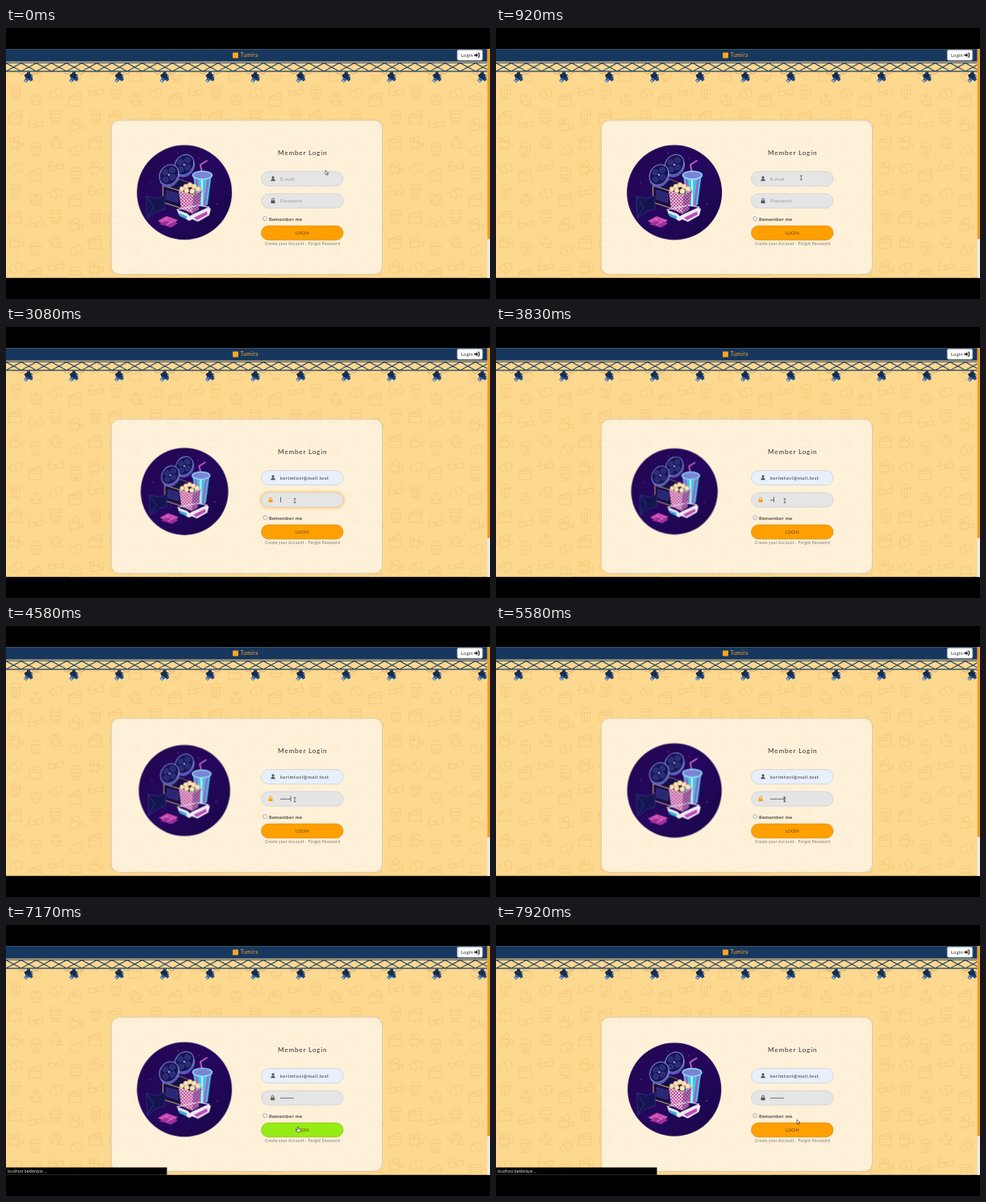
An HTML page that plays this animation: 600x337 px, repeating every 8 s.

```html
<!DOCTYPE html>
<html lang="en">
<head>
<meta charset="utf-8">
<title>Member Login</title>
<style>
html, body { margin: 0; width: 100%; height: 100%; overflow: hidden; background: #000; }
svg { display: block; width: 100%; height: 100%; font-family: Lato, sans-serif; }
#art { transform-origin: 221.2px 204.5px; }
.line { fill: none; stroke-linecap: round; stroke-linejoin: round; }
</style>
</head>
<body>
<svg viewBox="0 0 600 337">
<defs>
  <g id="icon0"><path d="M-6-3l2 11h8l2-11zM-2-3l1 11M2-3l-1 11M-6-3q-2-4 2-4q1-4 4-1q5-2 5 2q3 1 1 3"/></g>
  <g id="icon1"><circle r="7"/><circle cy="-4" r="1.800"/><circle cx="-3.500" cy="2" r="1.800"/><circle cx="3.500" cy="2" r="1.800"/><path d="M0 7h9"/></g>
  <g id="icon2"><path d="M-8 1l9-6l7 2l-1 4l1 3l-8 4l-7-3l1-2zM-2-3l4 8"/></g>
  <g id="icon3"><path d="M-8-3h15v11h-15zM-8-3l14-5l1 4M-4-4l2-3M1-6l3-2M-8 0h15"/></g>
  <g id="icon4"><path d="M-9 0l8-2l1 5l-7 2zM1-2l8-2l1 5l-8 2zM-9 0l2-7l3-1M9-4l-3-5"/></g>
  <g id="icon5"><path d="M-7-2l1 7h12l1-7M-6 1h12M-5 5l10 5M5 5l-10 5M-6-8h12v4h-12z"/></g>
  <g id="icon6"><path d="M-7 0h11v7h-11zM4 2l5-2v6l-5-2M-3 7l-3 4M0 7l3 4"/><circle cx="-5" cy="-3" r="2.500"/><circle cx="1" cy="-4" r="3.500"/></g>
  <pattern id="doodles" width="124" height="124" y="68" patternUnits="userSpaceOnUse">
    <g id="icons" class="line" stroke="#f4ca7c" stroke-width=".9"></g>
  </pattern>
  <pattern id="truss" width="18.77" height="13" y="42" patternUnits="userSpaceOnUse">
    <path d="M0 1.500L18.770 11.800M0 11.800L18.770 1.500M0 1.200H19M0 11.800H19" stroke="#1b3c64" stroke-width="1.150"/>
  </pattern>
  <g id="lamp">
    <path class="line" d="M-13 0q3 5 8 1M5 1q5 4 8-1" stroke="#a18b61" stroke-width=".6"/>
    <path d="M-2 0h4v3h-4z" fill="#183963"/>
    <path d="M-5.500 4l4-2.500l6 2l1 3l-4 4l-5-2z" fill="#172d4d"/>
    <path d="M-3 7l-3 4l3 2.500l4-4z" fill="#3568ab"/>
    <path d="M1 9l3-3l1.500 4l-3 2z" fill="#20477d"/>
    <path d="M-4.500 10.500l2 1.500M3.500 4.500l1.500 2" stroke="#c5d9eb" stroke-width="1.200"/>
  </g>
  <linearGradient id="night" x2="1" y2="1">
    <stop stop-color="#220650"/><stop offset=".5" stop-color="#25085e"/><stop offset="1" stop-color="#180747"/>
  </linearGradient>
  <filter id="soft" x="-20%" y="-60%" width="140%" height="220%"><feGaussianBlur stdDeviation="1.700"/></filter>
  <g id="wheel">
    <ellipse cx="2" cy="1.500" rx="11" ry="13.500" fill="#3b43a8" stroke="#7d86e3" stroke-width=".8"/>
    <ellipse rx="11" ry="13.500" fill="#17174f" stroke="#858bdf" stroke-width="1"/>
    <g fill="#2c2a78" stroke="#4b50b5" stroke-width=".5">
      <ellipse cy="-7" rx="3.500" ry="3.200"/><ellipse cx="-5.500" rx="2.800" ry="3.500"/><ellipse cx="5.500" rx="2.800" ry="3.500"/><ellipse cy="7" rx="3.500" ry="3.200"/>
    </g>
    <circle r="1.400" fill="#9aa0ee"/>
  </g>
  <pattern id="checks" width="4" height="4" patternUnits="userSpaceOnUse">
    <rect width="4" height="4" fill="#f3d2d8"/><path d="M0 0h2v2H0zM2 2h2v2H2z" fill="#b6459d"/>
  </pattern>
  <clipPath id="page"><path d="M0 26.300H600V310.700H0z"/></clipPath>
</defs>

<rect width="600" height="337"/>
<g clip-path="url(#page)">
  <rect y="26" width="600" height="285" fill="#fdd88f"/>
  <rect y="55" width="600" height="256" fill="url(#doodles)"/>
  <rect y="42" width="600" height="13" fill="url(#truss)"/>
  <g id="lamps"></g>
  <rect y="26" width="600" height="15.700" fill="#17375f"/>
  <rect x="281" y="30.500" width="7" height="7" rx="1" fill="#ffa51e"/>
  <text x="290.500" y="36.300" font-size="6.800" letter-spacing=".35" fill="#f5a42a">Tumira</text>
  <rect x="559.300" y="27.200" width="31.500" height="13" rx="2" fill="#fff" stroke="#8d99a8" stroke-width=".7"/>
  <text x="564" y="35.900" font-size="5.900" letter-spacing=".25" fill="#333">Login</text>
  <path d="M580.500 32.700h2.300v-1.500l2.600 2.500l-2.600 2.500v-1.500h-2.300z" fill="#222"/>
  <path class="line" d="M585 31.200h1.500v5h-1.500" stroke="#222"/>
  <rect x="596.700" y="26" width="3.300" height="285" fill="#ececed"/>
  <rect x="596.700" y="26" width="3.300" height="236.500" fill="#ee9d20"/>

  <rect x="130.500" y="114.800" width="336" height="191.500" rx="10" fill="#fff" fill-opacity=".66" stroke="#d8cbb0" stroke-width="1"/>

  <g id="art">
    <circle cx="221.200" cy="204.500" r="59" fill="url(#night)"/>
    <g fill="#b02fae"><circle cx="213" cy="156" r=".8"/><circle cx="239" cy="162" r=".7"/><circle cx="179" cy="192" r=".7"/><circle cx="262" cy="219" r=".8"/></g>
    <path d="M195 196l21-8l17 7l-1 24l-12 6l-25-8z" fill="#171046"/>
    <path d="M195 196l22 7l16-8l-1 24l-12 6l-25-8zM217 203l1 21" class="line" stroke="#e2b66c" stroke-width="1"/>
    <path d="M199 202l14 4v11l-14-4z" fill="#2b2775" stroke="#5550a5" stroke-width=".5"/>
    <path d="M195 196l21-8l17 7" class="line" stroke="#bd9170" stroke-width=".7"/>
    <use href="#wheel" transform="translate(221 170) rotate(35)"/>
    <use href="#wheel" transform="translate(202 182.500) rotate(35)"/>
    <path d="M174 209l13 3l10-4v17l-10 3l-12 9z" fill="#14154f" stroke="#34348a" stroke-width=".8"/>
    <path d="M175 210l8 13l-8 13" class="line" stroke="#2b347f"/>
    <path d="M244 184l-3-14l8-5" class="line" stroke="#c760c2" stroke-width="1.900"/>
    <path d="M232 183l23-1l-5 38q-7 4-13 0z" fill="#42c5e2"/>
    <path d="M236 187l4 33M251 186l-5 35" class="line" stroke="#b057c5" stroke-width="2.500"/>
    <path d="M243 188v33" stroke="#d7f3f6" stroke-width="2"/>
    <ellipse cx="243.500" cy="183" rx="12" ry="5" fill="#7b83d9" stroke="#95e6f5" stroke-width="1.400"/>
    <path d="M214 202l18 6l11-7l-4 25l-8 5l-14-6z" fill="url(#checks)"/>
    <path d="M232 208l11-7l-4 25l-8 5z" fill="#57217b" fill-opacity=".45"/>
    <path d="M214 202l18 6l11-7" class="line" stroke="#f7d9cf" stroke-width=".8"/>
    <g fill="#fbe6b7" stroke="#dbaa79" stroke-width=".5">
      <circle cx="218" cy="200" r="2.800"/><circle cx="238" cy="200" r="3"/><circle cx="223" cy="197" r="3"/>
      <circle cx="233" cy="197" r="3"/><circle cx="228" cy="195" r="3"/><circle cx="224" cy="202" r="3"/><circle cx="231" cy="203" r="3.200"/>
    </g>
    <path d="M212 226l13 5l3 3l3-2l20-9l3 2l-2 8l-14 8l-7-3l-4 2l-13-8z" fill="#f1eaf4"/>
    <path d="M214 230l10 4v4l-9-4z" fill="#38afd2"/><path d="M233 236l16-8l1 4l-13 7z" fill="#b94fb5"/>
    <path d="M212 226l24-5M252 223l-14-3" class="line" stroke="#e2d5ef" stroke-width="1.200"/>
    <path d="M188 240l11-6l14 5l-10 9z" fill="#d04eb3"/><path d="M190 244l11-6l12 5l-8 5z" fill="#a22f9d"/>
    <path d="M197 238l9 4M199 245l8-5" stroke="#f2a0d4" stroke-width=".8"/>
  </g>

  <text x="337" y="157.900" font-size="8.200" letter-spacing=".8" fill="#333">Member Login</text>

  <g id="mailGlow" class="line" stroke="#ffa000" filter="url(#soft)"><rect x="316.500" y="178.500" width="101.500" height="18" rx="9" stroke-width="4"/></g>
  <g id="passGlow" class="line" stroke="#ffa000" filter="url(#soft)"><rect x="316.500" y="206" width="101.500" height="18" rx="9" stroke-width="4"/></g>
  <rect id="mailBox" x="316.500" y="178.500" width="101.500" height="18" rx="9" stroke="#cdcdd0" stroke-width=".7"/>
  <rect x="316.500" y="206" width="101.500" height="18" rx="9" fill="#e5e5e6" stroke="#cdcdd0" stroke-width=".7"/>
  <g id="mailIcon"><circle cx="331" cy="185.800" r="1.600"/><path d="M328.300 190.200q0-2.700 2.700-2.700t2.700 2.700z"/></g>
  <g id="passIcon"><rect x="328.500" y="214.500" width="5" height="3.400" rx=".6"/><path class="line" d="M329.600 214.500v-1.200q0-1.400 1.400-1.400t1.400 1.400v1.200" stroke="currentColor" stroke-width=".9"/></g>
  <text id="mailText" x="340" y="189.600" font-size="5.900"></text>
  <text id="passHint" x="340" y="217" font-size="5.900" letter-spacing=".25" fill="#999">Password</text>
  <text id="passText" x="340" y="217" font-size="6" fill="#555" font-family="Liberation Sans, sans-serif"></text>
  <rect id="caret" width=".7" height="6.500" fill="#333"/>

  <rect x="319" y="234.900" width="4.200" height="4.200" rx=".8" fill="#fff" stroke="#777" stroke-width=".6"/>
  <text x="326" y="239.600" font-size="6" font-weight="500" letter-spacing=".3" fill="#222">Remember me</text>
  <rect id="button" x="316.500" y="246" width="101.500" height="17.700" rx="8.800" stroke-width=".7"/>
  <text x="367.300" y="256.800" font-size="5.500" text-anchor="middle" fill="#68480d">LOGIN</text>
  <text x="321" y="270" font-size="4.900" letter-spacing=".25" fill="#777">Create your Account - Forgot Password</text>

  <g id="menu" font-family="Open Sans, sans-serif" font-size="4.900" font-weight="500" fill="#222">
    <rect x="316.500" y="197" width="103" height="35" rx="1" fill="#0002"/>
    <rect x="316" y="196.500" width="103" height="34.500" rx="1" fill="#fff"/>
    <rect id="row" x="316" y="199" width="103" height="14" fill="#eaeaec"/>
    <text x="320.500" y="207.800">kerimtovl@mail.test</text>
    <text x="320.500" y="221.800">kerimtovl</text>
  </g>
  <g id="status">
    <rect y="301.500" width="199.500" height="9.500"/>
    <text x="1.500" y="307.800" font-size="4.800" font-family="Open Sans, sans-serif" fill="#eee">localhost bekleniyor...</text>
  </g>
</g>
<g id="pointer">
  <path id="arrow" d="M0 0v5.200l1.300-1.100l.9 1.900l.9-.4l-.8-1.900h1.700z" fill="#fff" stroke="#222" stroke-width=".6"/>
  <path id="beam" class="line" d="M-1-2.500h2M0-2.500v5M-1 2.500h2" stroke="#333" stroke-width=".6"/>
  <path id="hand" d="M-.7-3q.7-.7 1.300 0v2.400l2.200.6q.6.300.4 1.300l-.6 2.200h-3.200l-2-2.700q.4-1 1.900 0z" fill="#fff" stroke="#222" stroke-width=".6"/>
</g>
</svg>
<script>
const LOOP = 8000, STEP = 250 / 3;
const MAIL_FOCUS = 1250, MENU_OPEN = 1420, PREVIEW = 2170, PICK = 2420;
const PASS_FOCUS = 2830, HOVER = 6080, CLICK = 6830, LEAVE = 7580;
const keys = [3670, 3830, 4000, 4170, 4330, 4500, 5250, 5500];
const path = [
  [0, 396, 177], [420, 396, 177], [1080, 375, 188], [1900, 375, 188],
  [2170, 364, 205], [2420, 363, 206], [2750, 358, 216], [5920, 358, 216],
  [6250, 362, 254], [7420, 362, 254], [7750, 373, 242]
];
const $ = id => document.getElementById(id);
const clamp = v => Math.max(0, Math.min(1, v));
const ramp = (t, start, length) => clamp((t - start) / length);
const mix = (a, b, p) => `color-mix(in srgb, ${b} ${p * 100}%, ${a})`;
const show = (id, on) => $(id).style.display = on ? '' : 'none';
const repeat = (length, draw) => Array.from({ length }, (_, i) => draw(i)).join('');

$('lamps').innerHTML = repeat(11, i =>
  `<use href="#lamp" x="${28 + i * 56.25}" y="54.500"/>`);

// Staggered rows, five icons in each.
$('icons').innerHTML = repeat(20, i => {
  const col = i % 5, row = Math.floor(i / 5);
  return `<use href="#icon${(col + row * 3) % 7}" x="${12 + col * 24.8}" y="${12 + row * 31 + col % 2 * 9}"/>`;
});

const pulse = $('art').animate(
  [{ transform: 'scale(.9)' }, { transform: 'scale(1)' }],
  { duration: 3000, easing: 'ease', direction: 'alternate', iterations: Infinity });
pulse.pause();

function pointerAt(t) {
  const i = path.findLastIndex(p => p[0] <= t);
  const [t0, x0, y0] = path[i], [t1, x1, y1] = path[i + 1] || [LOOP, x0, y0];
  const p = ramp(t, t0, t1 - t0), e = p * p * (3 - 2 * p);
  return [x0 + (x1 - x0) * e, y0 + (y1 - y0) * e];
}

function setIcon(id, p) {
  const tint = mix('#555', '#ffa000', p);
  $(id).style.color = $(id).style.fill = tint;
  $(id).setAttribute('transform', `translate(${-3 * p} 0)`);
}

function setGlow(id, t, start) {
  const p = ramp(t, start, 500);
  $(id).style.opacity = Math.sin(p * Math.PI) * .38;
}

function render(t) {
  pulse.currentTime = t + 2450;

  const mailFocused = t >= MAIL_FOCUS && t < PASS_FOCUS;
  const passFocused = t >= PASS_FOCUS && t < CLICK;
  setIcon('mailIcon', ramp(t, MAIL_FOCUS, 400) - ramp(t, PASS_FOCUS - 200, 400));
  setIcon('passIcon', ramp(t, PASS_FOCUS - 170, 400) - ramp(t, CLICK, 400));
  setGlow('mailGlow', t, MAIL_FOCUS);
  setGlow('passGlow', t, PASS_FOCUS);

  const filled = t >= PREVIEW;
  const mail = $('mailText');
  mail.textContent = filled ? 'kerimtovl@mail.test' : mailFocused ? '' : 'E-mail';
  mail.setAttribute('fill', filled ? '#333' : '#999');
  mail.setAttribute('letter-spacing', filled ? .5 : .25);
  $('mailBox').style.fill = filled ? '#e8f0fc' : '#e5e5e6';

  const typed = keys.filter(k => k <= t).length;
  $('passText').textContent = '•'.repeat(typed);
  show('passHint', t < PASS_FOCUS);

  const lastKey = typed ? keys[typed - 1] : passFocused ? PASS_FOCUS : MAIL_FOCUS;
  show('caret', (mailFocused && !filled || passFocused) && (t - lastKey) % 1000 < 500);
  $('caret').setAttribute('x', 340 + typed * 2.1);
  $('caret').setAttribute('y', passFocused ? 211.5 : 184);

  show('menu', t >= MENU_OPEN && t < PICK);
  show('row', t >= PREVIEW - 80);
  show('status', t >= CLICK + 80);

  const hover = ramp(t, HOVER, 300) - ramp(t, LEAVE, 250);
  $('button').style.fill = mix('#ffa000', '#95ec14', hover);
  $('button').style.stroke = mix('#d08a18', '#9dbb22', hover);

  const [x, y] = pointerAt(t);
  $('pointer').setAttribute('transform', `translate(${x} ${y})`);
  const overMail = y > 179 && y < 196, overPass = y > 206.5 && y < 224, overButton = y > 246;
  show('beam', overMail || overPass);
  show('hand', overButton);
  show('arrow', !overMail && !overPass && !overButton);
}

function tick(now) {
  const t = now % LOOP;
  render(Math.floor((t + 4) / STEP) * STEP);
  requestAnimationFrame(tick);
}
render(0);
requestAnimationFrame(tick);
</script>
</body>
</html>
```
